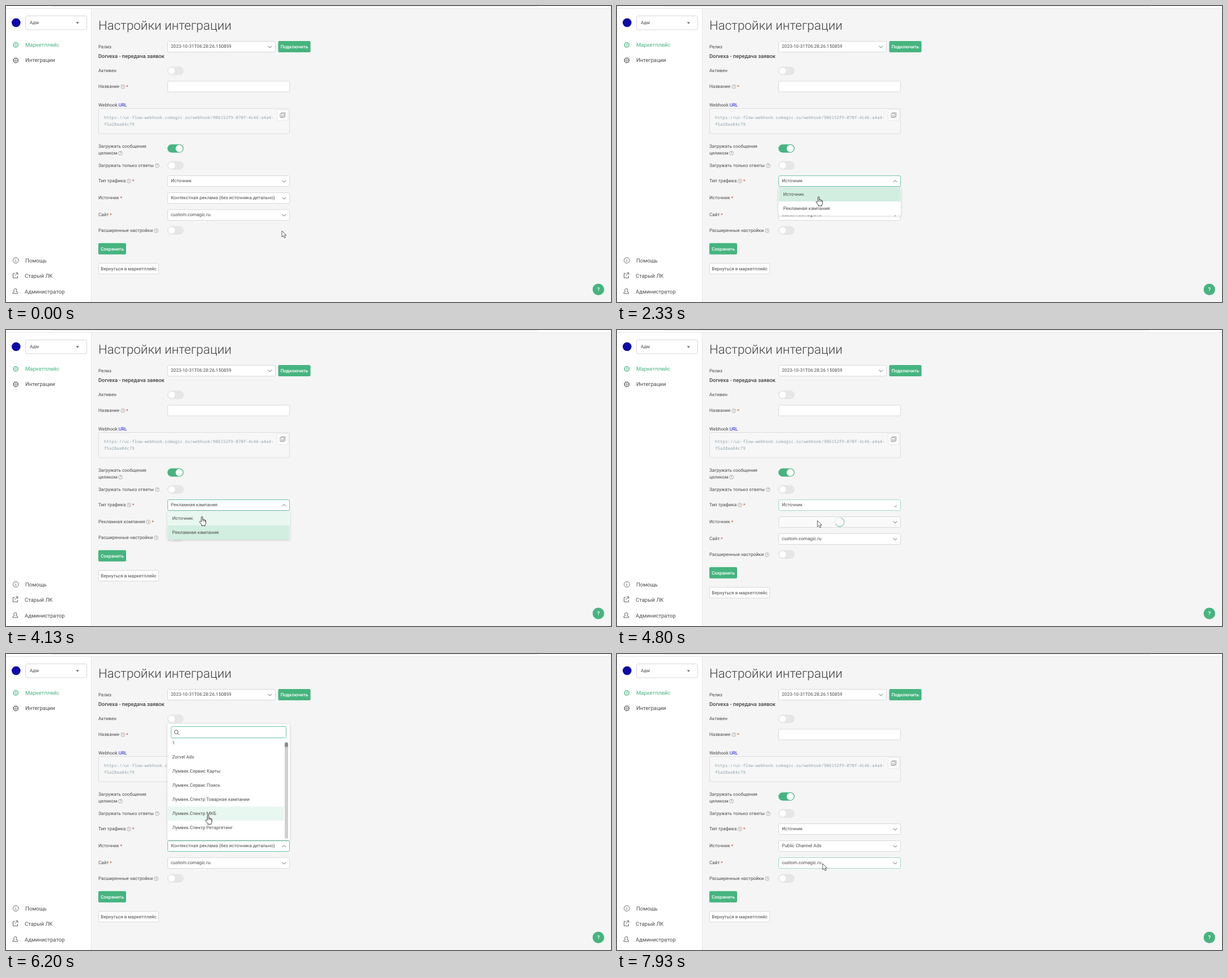
Animation, 1068 px wide and 524 px high, one loop 8000 ms. Source, as an HTML page:

```html
<!DOCTYPE html>
<html lang="ru">
<head>
<meta charset="utf-8">
<title>Настройки интеграции</title>
<style>
html, body { margin: 0; width: 100%; height: 100%; overflow: hidden; background: #f5f5f5; }
svg { display: block; width: 1068px; height: 524px; font-family: Roboto, sans-serif; text-rendering: geometricPrecision; }
text { white-space: pre; }
.mono { font-family: "Noto Sans Mono", monospace; }
.panel { filter: drop-shadow(0 1px 2px rgba(0,0,0,.16)); }
</style>
</head>
<body>
<svg viewBox="0 0 1068 524">
  <defs><clipPath id="listClip"><rect x="285" y="153" width="216" height="174"/></clipPath></defs>
  <g id="base"></g><g id="form"></g><g id="popup"></g><g id="pointer"></g>
</svg>
<script>
const LOOP = 8000, TICK = 1000 / 15;
const GREEN = '#46b47f', FOCUS = '#6cc5a6', HOVER = '#a0d8c5', LINE = '#d9d9d9', INK = '#4b4b4b';
const $ = id => document.getElementById(id);

// Drawing helpers
const text = (x, y, s, fill = INK, size = 8.15, more = '') =>
  `<text x="${x}" y="${y + size * .355}" font-size="${size}" fill="${fill}" ${more}>${s}</text>`;
const rect = (x, y, w, h, r, fill, stroke = 'none', more = '') =>
  `<rect x="${x}" y="${y}" width="${w}" height="${h}" rx="${r}" fill="${fill}" stroke="${stroke}" ${more}/>`;
const path = (d, stroke, width = 1, fill = 'none') =>
  `<path d="${d}" stroke="${stroke}" stroke-width="${width}" fill="${fill}" stroke-linejoin="round"/>`;
const circle = (x, y, r, fill, stroke = 'none', width = 1) =>
  `<circle cx="${x}" cy="${y}" r="${r}" fill="${fill}" stroke="${stroke}" stroke-width="${width}"/>`;

const help = (x, y) => circle(x, y, 3.5, 'none', '#858585', .6) +
  text(x, y, '?', '#777', 5.4, 'text-anchor="middle"');
const star = (x, y) => text(x, y + .6, '*', '#d0532f', 8.8);
const label = (y, s, helpX, starX) => text(163, y, s) +
  (helpX ? help(helpX, y + .5) : '') + (starX ? star(starX, y) : '');
const toggle = (y, on) => rect(285.3, y - 7, 27.8, 14, 7, on ? GREEN : '#e6e6e6', on ? GREEN : '#dcdcdc', 'stroke-width=".6"') +
  circle(on ? 305.8 : 292.4, y, 6.3, '#fff', on ? 'none' : '#d5d5d5', .5);
const chevron = (x, y, up) => path(up ? `M${x - 3.3} ${y + 1.7}l3.3 -3.3l3.3 3.3` : `M${x - 3.3} ${y - 1.6}l3.3 3.3l3.3 -3.3`, '#555', .9);
const button = (x, y, w, s, solid) =>
  (solid ? rect(x, y - 10, w, 20, 2, GREEN) : rect(x + .5, y - 9.5, w - 1, 19, 2, '#fff', LINE)) +
  text(x + w / 2, y, s, solid ? '#fff' : INK, 8.15, `text-anchor="middle" font-weight="${solid ? 500 : 400}"`);
const arc = (x, y, r, t, share, color, width) => {
  const len = 2 * Math.PI * r;
  return `<circle cx="${x}" cy="${y}" r="${r}" fill="none" stroke="${color}" stroke-width="${width}"
    stroke-dasharray="${len * share} ${len}" transform="rotate(${t * .36 % 360} ${x} ${y})"/>`;
};
const suffixSpin = (y, t) => arc(491.5, y, 2.4, t + 250, .3, '#555', .8);
const bodySpin = (y, t) => circle(393, y, 8, 'none', '#d5e6df', .8) + arc(393, y, 8, t, .62, FOCUS, 1);

function field(y, s, { w = 215, border = LINE, fill = '#fff', mark = chevron(276 + w, y + .2) } = {}) {
  return rect(285.5, y - 9.5, w, 19, 2, fill, border) + text(291, y - .4, s) + mark;
}

function drawBase() {
  const gear = (x, y, c) => circle(x, y, 3.9, 'none', c, 1.1) +
    `<circle cx="${x}" cy="${y}" r="4.5" fill="none" stroke="${c}" stroke-width=".9" stroke-dasharray="1.8 1.73"/>` + circle(x, y, 1.5, 'none', c, .8);
  const menu = (x, y, s, c = INK) => text(x, y, s, c, 9.5);
  return rect(0, 0, 1068, 524, 0, '#f5f5f5') + rect(0, 0, 1068, 4, 0, '#fff') +
    rect(82, 0, 858, 1, 0, '#e9e9e9') + rect(0, 4, 1068, .8, 0, '#e4e4e4') +
    rect(0, 5, 150, 519, 0, '#fff') + rect(150, 5, .8, 519, 0, '#e2e2e2') +
    circle(17.8, 29.5, 7.8, '#0c0aa8') +
    rect(34.5, 17.5, 108, 24.5, 3, '#fff', '#d6d6d6') + text(42, 29.4, 'Адм', INK, 8) +
    path('M123.5 28.5h5.4l-2.7 3.2z', 'none', 0, '#666') +
    gear(17.2, 68.8, GREEN) + gear(17.2, 96.2, INK) +
    menu(34, 68.2, 'Маркетплейс', GREEN) + menu(34, 96, 'Интеграции') +
    menu(34, 450.3, 'Помощь') + menu(33, 477.6, 'Старый ЛК') + menu(33, 505.3, 'Администратор') +
    circle(17.3, 450.3, 4.9, 'none', INK, .8) + path('M17.3 449.6v3.2M17.3 447.4v1', INK, .9) +
    path('M15.5 473.3h-3v8h8v-3.3M17.2 472.3h3.6v3.6M20.6 472.5l-5 5', INK, .9) +
    path('M12 509v-1.4q0-1.3 1.5-1.5l1.3-.5q-1.2-1.2-1.2-3t2.7-2t2.7 2t-1.2 3l1.3.5q1.5.2 1.5 1.5v1.4z', INK, .9) +
    text(163, 34.4, 'Настройки интеграции', '#404040', 22.35, 'font-weight="300"') +
    label(72, 'Релиз') + field(72, '2023-10-31T06:28:26.150859', { w: 190 }) + button(480.5, 72, 57, 'Подключить', true) +
    text(163, 88.6, 'Dorvexa - передача заявок', '#404040', 9.35, 'font-weight="500"') +
    label(114.5, 'Активен') + toggle(114.8) +
    label(142.3, 'Название', 206.3, 212) + field(142.5, '', { mark: '' }) +
    text(163, 175.6, 'Webhook <tspan fill="#1414e0">URL</tspan>') +
    rect(163.5, 181.5, 337, 44.5, 2, '#f7f7f7', '#dedede') +
    text(173, 197.2, 'https://uc-flow-webhook.comagic.ru/webhook/906152f9-070f-4c46-a4a4-', '#90a4ae', 7.46, 'class="mono"') +
    text(173, 209.3, 'f5a28aa84c79', '#90a4ae', 7.46, 'class="mono"') +
    rect(478.5, 183.5, 19.5, 19.5, 2, '#fcfcfc', '#e8e8e8') +
    path('M486 190.2v-1.4h6.8v7h-1.5M484 190.5h7v7h-7zM485.5 194h4M485.5 195.8h4', '#8a8a8a', .8) +
    label(248, 'Загружать сообщения') + label(260, 'целиком', 202) + toggle(252.2, true) +
    label(282, 'Загружать только ответы', 266.8) + toggle(282.2) +
    label(309.3, 'Тип трафика', 217, 222.8) +
    circle(1045.7, 501.7, 10.2, GREEN) + text(1045.7, 501.7, '?', '#fff', 9.5, 'text-anchor="middle" font-weight="500"');
}

// Pointer route: time, x, y
const ROUTE = [
  [0, 487, 398], [400, 446, 360], [870, 402, 325], [1200, 376, 309], [1470, 381, 321], [1610, 381, 321],
  [1930, 369, 313], [2070, 369, 313], [2530, 348, 354], [2680, 348, 354], [2930, 357, 346], [3330, 363, 309.5],
  [3470, 363, 309.5], [3530, 364, 309.5], [3700, 364, 309.5], [4130, 346, 331], [4450, 346, 331], [5000, 357, 340],
  [5270, 358, 340], [5530, 358, 370], [5650, 358, 370], [6070, 357, 288], [6600, 355, 275], [6860, 355, 275],
  [7600, 359, 352], [7930, 363, 371], [LOOP, 363, 371]
];
const MENUS = [[2070, 2730], [3730, 4400]], LIST = [5270, 6800];
const CAMPAIGN = [2730, 4400], LOADS = [[2730, 3270], [4400, 4930]], PICK_LOAD = [6800, 7270];
const WHEEL = [6170, 6300, 6430], NOTCH = 61;
const TYPES = ['Источник', 'Рекламная кампания'];
const CONTEXT = 'Контекстная реклама (без источника детально)', PICK = 'Public Channel Ads';
const ITEMS = ['1', 'Zorvel Ads', 'Лумвек.Сервис Карты', 'Лумвек.Сервис Поиск', 'Лумвек.Спектр Товарная кампании',
  'Лумвек.Спектр МКБ', 'Лумвек.Спектр Ретаргетинг', 'Лумвек.Спектр РСЛ', 'Лумвек.Спектр Поиск', 'Dulm Ads',
  CONTEXT, 'Ходик', PICK, 'TZ Ads', 'Прочие системы'];
const ROWS = { type: 310, second: 340, site: 370 };

const clamp = v => Math.max(0, Math.min(1, v));
const smooth = v => (v = clamp(v)) * v * (3 - 2 * v);
const within = (t, [a, b]) => t >= a && t < b;
const shown = (t, [a, b]) => Math.min(smooth((t - a + 70) / 200), smooth((b + 130 - t) / 200));

function place(t) {
  const i = Math.max(1, ROUTE.findIndex(k => k[0] >= t));
  const [a, b] = [ROUTE[i - 1], ROUTE[i]], k = smooth((t - a[0]) / (b[0] - a[0]));
  return { x: a[1] + (b[1] - a[1]) * k, y: a[2] + (b[2] - a[2]) * k };
}

function drawForm(t, p, s) {
  const over = y => !s.covered && p.x > 285 && p.x < 501 && Math.abs(p.y - y) < 10;
  const select = (y, value, open, loading) => field(y, value, {
    border: open ? FOCUS : loading || over(y) ? HOVER : LINE,
    mark: loading ? suffixSpin(y, t) : chevron(491, y + .2, open)
  });
  const busy = y => field(y, '', { fill: '#fafafa' }) + bodySpin(y, t);
  const { type, second, site } = ROWS, low = s.campaign ? 0 : 30;

  let out = select(type, TYPES[+s.campaign], s.menu, s.wait);
  if (s.campaign) {
    out += label(339.3, 'Рекламная компания', 251.2, 257.3) + (s.wait ? busy(second) : select(second, ''));
  } else {
    out += label(339.3, 'Источник', 0, 201.5) + label(369.5, 'Сайт', 0, 183) +
      (s.wait ? busy(second) : select(second, s.source, s.list, within(t, PICK_LOAD))) +
      select(site, 'custom.comagic.ru');
  }
  return out + label(367.2 + low, 'Расширенные настройки', 265) + toggle(367.2 + low) +
    button(163, 399.8 + low, 49, 'Сохранить', true) + button(163, 435 + low, 107, 'Вернуться в маркетплейс');
}

const panel = (k, edge, s) =>
  `<g class="panel" opacity="${k}" transform="translate(0 ${edge * (1 - k) * .2}) scale(1 ${.8 + .2 * k})">${s}</g>`;
const option = (y, w, name, chosen, over) =>
  rect(285.5, y, w, 25, 0, chosen ? '#d1eee1' : over ? '#e9f7f1' : '#fff') + text(293.5, y + 12, name);

function drawMenu(p, chosen, k) {
  const rows = TYPES.map((name, i) => {
    const y = 321 + i * 25;
    return option(y, 215, name, i === chosen, Math.abs(p.y - y - 12.5) < 12.5);
  }).join('');
  return panel(k, 321, rect(285, 321, 216, 50, 2, '#fff') + rows);
}

function drawList(t, p, k) {
  const scroll = WHEEL.reduce((sum, w) => sum + NOTCH * smooth((t - w) / 140), 0);
  const rows = ITEMS.map((name, i) => {
    const y = 154 + i * 25 - scroll, over = p.y < 327 && Math.abs(p.y - y - 12.5) < 12.5;
    return option(y, 205, name, name === CONTEXT, over);
  }).join('');
  const caret = (t - LIST[0]) % 1000 < 500 ? path('M310.5 134.2v9.6', '#333', .8) : '';
  return panel(k, 328, rect(285, 124, 216, 205, 2, '#fff') + `<g clip-path="url(#listClip)">${rows}</g>` +
    rect(291.5, 128.5, 203, 20, 2, '#fff', FOCUS) + circle(300.6, 138, 3.3, 'none', '#444', .9) +
    path('M303 140.5l3 3', '#444', 1) + caret +
    rect(492, 156, 6, 171, 2.5, '#d0d0d0') + rect(492, 156 + scroll * .08, 6, 8, 2.5, '#8c8c8c'));
}

const POINTERS = {
  arrow: path('M0 0v11l2.6-2.4l1.8 4l1.9-.9l-1.8-3.8h3.3z', '#333', .8, '#fff'),
  beam: path('M-2.4-5.7q2 0 2.4.9q.4-.9 2.4-.9M0-5V5M-2.4 5.7q2 0 2.4-.9q.4.9 2.4.9', '#222', 1.1),
  hand: path('M-1.2 8V.6Q-1.2-.6 0-.6T1.2.6V5Q1.5 4 2.5 4.2T3.4 5.4Q3.7 4.6 4.6 4.9T5.4 6Q6.7 5.5 6.8 7V11Q6.8 12.6 5.6 13.6V15.4H-.6V13.8L-4.2 9.5Q-4.8 8.2-3.7 7.7T-1.2 9.2', '#222', .9, '#fff') +
    path('M1.2 5v3M3.4 5.4v2.7M5.4 6v2.4', '#222', .7)
};

function pointerKind(p, s) {
  if (s.menu && p.y > 321 && p.y < 371) return 'hand';
  if (s.list && p.y < 327) return p.y > 150 ? 'hand' : 'beam';
  const ends = [[ROWS.type, s.campaign ? 373 : 328]];
  if (!s.campaign) ends.push([ROWS.site, 361]);
  if (!s.campaign && !s.wait) ends.push([ROWS.second, s.source === CONTEXT ? 475 : 358]);
  return ends.some(([y, end]) => p.x > 290 && p.x < end && Math.abs(p.y - y) < 5.5) ? 'beam' : 'arrow';
}

function render(t) {
  const p = place(t);
  const s = {
    campaign: within(t, CAMPAIGN), wait: LOADS.some(l => within(t, l)),
    menu: MENUS.some(m => within(t, m)), list: within(t, LIST),
    source: t < LIST[1] ? CONTEXT : PICK
  };
  s.covered = (s.menu && p.y > 321) || (s.list && p.y < 328);
  const list = shown(t, LIST);
  $('form').innerHTML = drawForm(t, p, s);
  $('popup').innerHTML = MENUS.map((m, i) => shown(t, m) > 0 ? drawMenu(p, i, shown(t, m)) : '').join('') +
    (list > 0 ? drawList(t, p, list) : '');
  $('pointer').innerHTML = `<g transform="translate(${p.x} ${p.y})">${POINTERS[pointerKind(p, s)]}</g>`;
}

$('base').innerHTML = drawBase();
const start = performance.now();
let last = -1;
function loop() {
  const tick = Math.floor(((performance.now() - start) % LOOP + 4) / TICK);
  if (tick !== last) render(Math.min(LOOP, (last = tick) * TICK + 4));
  requestAnimationFrame(loop);
}
render(0);
requestAnimationFrame(loop);
</script>
</body>
</html>
```
